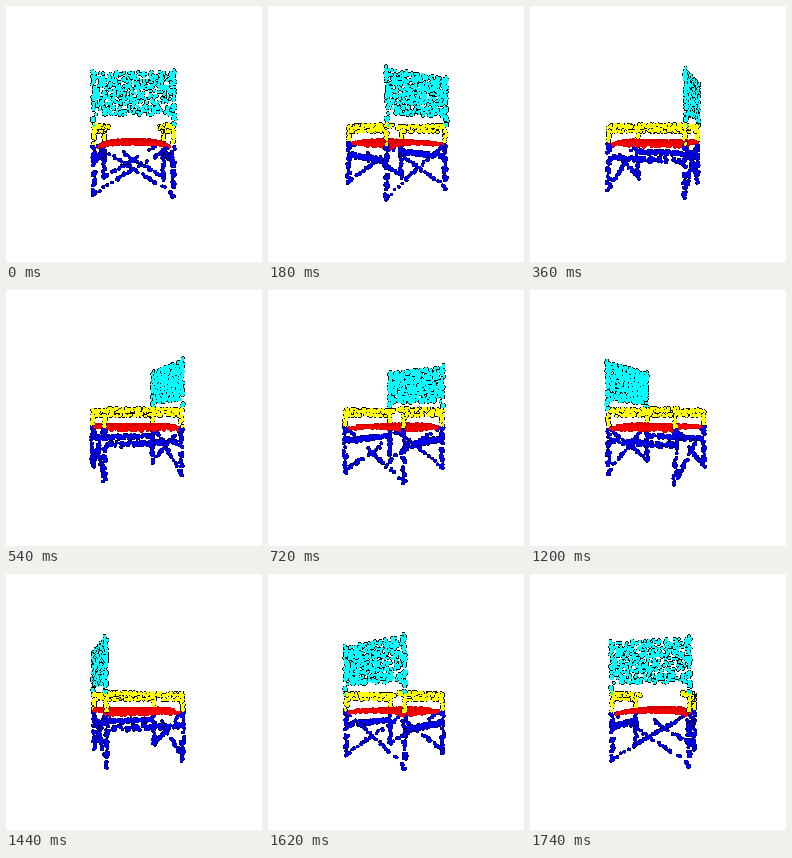
These frames come from a looping animation (256x256 px, 1.8 s). A matplotlib script:

```python
import numpy as np
import matplotlib.pyplot as plt
from matplotlib.animation import FuncAnimation

SIZE, DPI = 256, 100
FRAMES, STEP = 30, 60
CX, CY, CAMERA = 127.7, 125, 240
CYAN, YELLOW, RED, BLUE = (0, 1, 1), (1, 1, 0), (1, 0, 0), (0, 0, 0.95)

rng = np.random.default_rng(7)
parts, tints, shades = [], [], []


def add(points, color, shade=0.05):
    parts.append(points)
    tints.append(np.tile(color, (len(points), 1)))
    shades.append(tints[-1] * shade)


def box(n, x, y, z):
    low, high = np.transpose([x, y, z])
    return rng.uniform(low, high, (n, 3))


def bar(n, start, end, r=1.2):
    t = rng.uniform(0, 1, (n, 1))
    return np.array(start) * (1 - t) + np.array(end) * t + rng.uniform(-r, r, (n, 3))


def spread(n, x, y, z, gap):
    """Random points in a box, none closer than gap."""
    kept = []
    for p in box(n * 8, x, y, z):
        if not kept or np.min(np.sum((np.array(kept) - p) ** 2, axis=1)) > gap ** 2:
            kept.append(p)
        if len(kept) == n:
            break
    return np.array(kept)


# Backrest: cloth and posts
add(spread(440, (-34.5, 34.5), (13.5, 50.5), (34, 36), 0.9), CYAN)
for side in (-1, 1):
    add(bar(42, (side * 34.5, 4, 35.5), (side * 34.5, 51, 35), 1.2), CYAN)

# Seat
seat = spread(850, (-31, 31), (-11.6, -10), (-36, 36), 0.8)
seat[:, 1] -= 2.5 * np.abs(seat[:, 0] / 31) ** 4
add(seat, RED, 0.8)

for side in (-1, 1):
    # Armrest and its struts
    add(box(150, sorted((side * 28, side * 35.5)), (2.5, 6), (-38, 36)), YELLOW)
    add(bar(50, (side * 34, 0, -36), (side * 34, 0, 36), 1.3), YELLOW)
    for z in (-36, 34.5):
        add(bar(16, (side * 34, 0, z), (side * 34, -11, z)), YELLOW)
        add(bar(40, (side * 34, -12, z), (side * 34, -57, z), 1.5), BLUE, 0.3)
        add(bar(32, (side * 32, -13, z), (-side * 33, -53, z)), BLUE, 0.3)
    # Side rails
    add(box(75, sorted((side * 32, side * 35)), (-27, -22.5), (-35, 34)), BLUE, 0.3)

cloud = np.vstack(parts)
faces = np.vstack(shades + tints)
rims = np.repeat([2.8, 1.75], len(cloud))
areas = (rims * 72 / DPI) ** 2

fig = plt.figure(figsize=(SIZE / DPI, SIZE / DPI), dpi=DPI, facecolor="white")
ax = fig.add_axes([0, 0, 1, 1])
ax.set(xlim=(0, SIZE), ylim=(SIZE, 0))
ax.axis("off")
dots = ax.scatter(np.zeros(len(areas)), np.zeros(len(areas)), s=areas,
                  c=faces, linewidths=0, antialiased=False)


def draw(i):
    a = 2 * np.pi * i / FRAMES
    x, y, z = cloud.T
    side = x * np.cos(a) + z * np.sin(a)
    depth = z * np.cos(a) - x * np.sin(a)
    scale = CAMERA / (CAMERA - depth)
    spots = np.column_stack([CX + side * scale, CY - y * scale])
    # Dark rims sit a little behind their bright centres
    order = np.argsort(np.concatenate([depth - 5, depth]))
    dots.set_offsets(np.vstack([spots, spots])[order])
    dots.set_sizes(areas[order], DPI)
    dots.set_facecolors(faces[order])
    return (dots,)


anim = FuncAnimation(fig, draw, frames=FRAMES, interval=STEP,
                     repeat=True, repeat_delay=0, blit=False)
plt.show()
```
